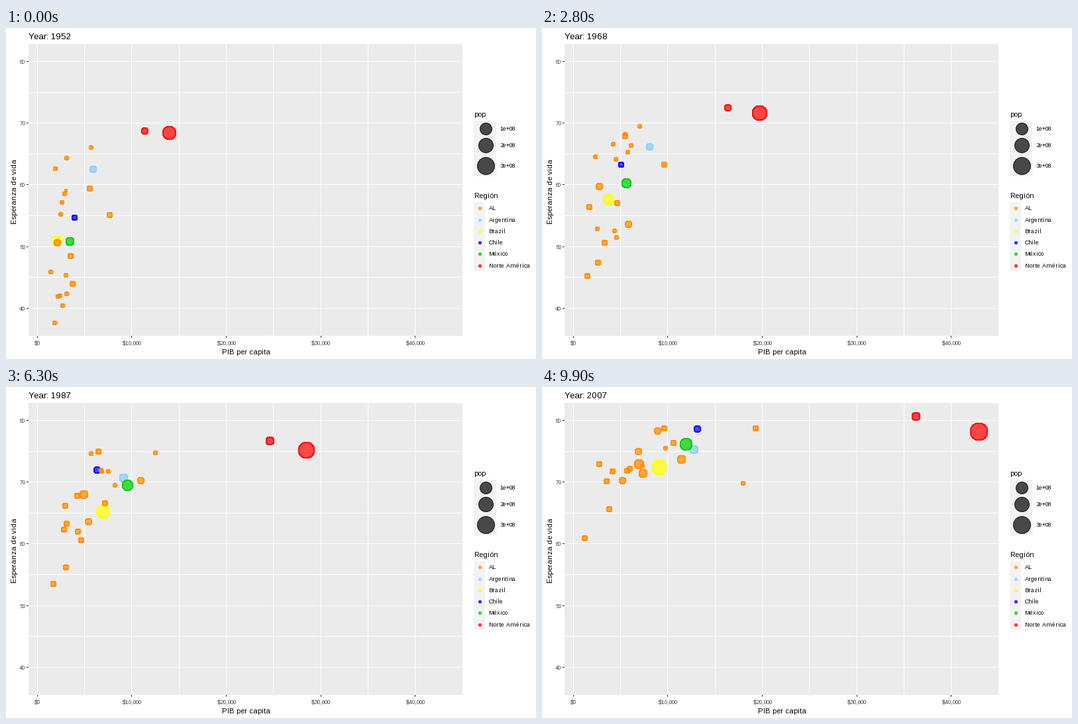
A matplotlib script for the animation above (10000 ms loop, 800 by 500 pixels).

```python
import numpy as np
import matplotlib.pyplot as plt
from matplotlib.animation import FuncAnimation
from matplotlib.colors import to_rgba
from matplotlib.patches import Rectangle

plt.rcParams["font.family"] = "Liberation Sans"
plt.rcParams["text.hinting_factor"] = 1  # whole-pixel glyph widths

W, H, DPI = 800, 500, 100
PT = 72 / DPI  # points per pixel
LEFT, RIGHT, TOP, BOTTOM = 34, 689, 24.3, 465.1
FRAMES, STEP, SPAN = 100, 9, 11  # a survey every nine frames, five years apart
INCOME_KEYS = (0, 3, 6, 8, SPAN)
LIFE_KEYS = (0, 6, SPAN)
POP_RANGE = 0.66, 301.1
FILL, RIM = 0.7, 0.85  # opacities

COLORS = {
    "AL": "darkorange", "Argentina": "#87CEFF", "Brazil": "yellow",
    "Chile": "blue", "México": "#00CD00", "Norte América": "red",
}

tracks = []


def track(region, pop, income, life):
    """Key points: population in millions, income in $100, life in years."""
    tracks.append((COLORS[region], pop, income, life))


track("Argentina", (17.9, 40.3), (59, 80.5, 90, 93, 128), (62.5, 69.5, 75.3))
track("AL", (2.9, 9.1), (27, 26, 31.6, 29.6, 38), (40.4, 53.9, 65.6))
track("Brazil", (56.6, 190), (21, 36, 70, 69.5, 90.7), (50.9, 63.3, 72.4))
track("Norte América", (14.8, 33.4), (114, 161, 229, 263.4, 363), (68.8, 75.7, 80.7))
track("Chile", (6.4, 16.3), (39.4, 51, 51, 76, 131.7), (54.7, 70, 78.6))
track("AL", (12.4, 44.2), (21.4, 26.8, 44, 54.4, 70), (50.6, 66.2, 72.9))
track("AL", (0.9, 4.1), (26.3, 41.6, 52.6, 61.6, 96.5), (57.2, 73, 78.8))
track("AL", (6, 11.4), (55.9, 54, 73.2, 56, 89.5), (59.4, 73.5, 78.3))
track("AL", (2.5, 9.3), (14, 16.5, 28.6, 30.4, 60), (45.9, 64, 72.2))
track("AL", (3.5, 13.8), (35.2, 45.8, 72, 71, 68.7), (48.4, 64.3, 75))
track("AL", (2, 6.9), (30.5, 43.6, 41, 44.4, 57.3), (45.3, 59.5, 71.9))
track("AL", (3.1, 12.6), (24.3, 32.4, 48.2, 44.4, 51.9), (42, 58.1, 70.3))
track("AL", (3.2, 8.5), (18.4, 14.5, 20, 14.6, 12), (37.6, 51.5, 60.9))
track("AL", (1.5, 7.5), (22, 25.4, 31.2, 30.8, 35.5), (41.9, 60.9, 70.2))
track("AL", (1.4, 2.8), (29, 61.2, 60.7, 74, 73.2), (58.5, 71, 72.6))
track("México", (30.1, 108.7), (34.8, 55, 96, 94.7, 119.8), (50.8, 67.4, 76.2))
track("AL", (1.2, 5.7), (31, 46.4, 34.7, 21.7, 27.5), (42.3, 59.6, 72.9))
track("AL", (0.9, 3.2), (24.8, 44.2, 70, 66.2, 98), (55.2, 70.2, 75.5))
track("AL", (1.6, 6.7), (19.5, 23, 42.6, 42, 41.7), (62.6, 66.9, 71.8))
track("AL", (8, 28.7), (37.6, 57.9, 64.3, 44.5, 74), (43.9, 61.3, 71.4))
track("AL", (2.2, 3.9), (30.8, 69.3, 103.3, 146.4, 193.3), (64.3, 73.6, 78.7))
track("AL", (0.66, 1.1), (30.2, 56.2, 91.2, 73.7, 180), (59.1, 68.8, 69.8))
track("Norte América", (157.6, 301.1), (140, 195.3, 250, 320, 429.5), (68.4, 74.3, 78.2))
track("AL", (2.3, 3.4), (57.2, 54.4, 69.2, 81.4, 106), (66.1, 70.8, 76.4))
track("AL", (5.4, 26.1), (76.9, 95.4, 111.5, 107.3, 114.2), (55.1, 68.8, 73.7))


def scale(lo, hi, start, end):
    """Linear map that leaves 5% room at both ends."""
    pad = 0.05 * (hi - lo)
    return lambda v: start + (v - lo + pad) / (hi - lo + 2 * pad) * (end - start)


px = scale(1201.6, 42951.7, LEFT, RIGHT)
py = scale(37.58, 80.65, BOTTOM, TOP)


def dot_size(pop):
    lo, hi = POP_RANGE
    return 2 + 10 * np.sqrt((np.asarray(pop) - lo) / (hi - lo))


def area(size):
    """Scatter area of a dot sized in millimetres, in whole-pixel radii."""
    radius = np.round(0.375 * (size * 72.27 / 25.4 + 0.945))
    return (2 * radius * PT) ** 2


def pixel(v):
    return np.round(v) + 0.5


fig = plt.figure(figsize=(W / DPI, H / DPI), dpi=DPI, facecolor="white")
ax = fig.add_axes([0, 0, 1, 1])
ax.set(xlim=(0, W), ylim=(H, 0))
ax.axis("off")


def box(x0, y0, x1, y1, color):
    ax.add_patch(Rectangle((x0, y0), x1 - x0, y1 - y0, fc=color, lw=0,
                           aa=False, zorder=1))


def label(x, y, s, size, color="black", **kw):
    return ax.text(x, y, s, fontsize=size * PT, color=color, va="baseline", **kw)


def dots(x, y, size, colors):
    return ax.scatter(pixel(x), pixel(y), s=area(size),
                      c=[to_rgba(c, FILL) for c in colors],
                      edgecolors=[to_rgba(c, RIM) for c in colors],
                      linewidths=PT, antialiaseds=False, zorder=3)


def vline(x, y0, y1, color):
    x = np.round(x)
    box(x, y0, x + 1, y1, color)


def hline(y, x0, x1, color):
    y = np.round(y)
    box(x0, y, x1, y + 1, color)


# Panel, grid and axes
box(LEFT, 24, RIGHT, 465, "#EBEBEB")
for v in range(0, 45000, 5000):
    vline(px(v), 24, 465, "white")
for v in range(40, 85, 5):
    hline(py(v), LEFT, RIGHT, "white")
for v in range(0, 50000, 10000):
    vline(px(v), 465, 468, "#333333")
    label(px(v) + 0.5, 479, f"${v:,}", 9, "#4D4D4D", ha="center")
for v in range(40, 90, 10):
    hline(py(v), 31, LEFT, "#333333")
    label(29, np.round(py(v)) + 4, str(v), 9, "#4D4D4D", ha="right")
label(362, 493, "PIB per capita", 11, ha="center")
label(16, 246.5, "Esperanza de vida", 11, rotation=90,
      rotation_mode="anchor", ha="center")

# Legends
label(706, 134, "pop", 11)
box(706, 140, 740, 224, "#F2F2F2")
y = 139.7
for n in (1, 2, 3):
    size = dot_size(100 * n)
    height = size * 7.2 / 2.54
    mid = y + height / 2
    dots([723], [mid], size, ["black"])
    label(745, np.round(mid) + 4, f"{n}e+08", 9)
    y += height

label(706, 257, "Región", 11)
box(706, 263, 723, 367, "#F2F2F2")
for i, (name, color) in enumerate(COLORS.items()):
    mid = 262.6 + 17.28 * (i + 0.5)
    dots([714], [mid], 1.5, [color])
    label(729, np.round(mid) + 4, name, 9)

# Moving dots: income in straight legs, life expectancy on a parabola
colors, pops, incomes, lives = zip(*tracks)
first, last = dot_size(pops).T
bend, slope, base = np.polyfit(LIFE_KEYS, np.transpose(lives), 2)


def state(t):
    income = np.array([100 * np.interp(t, INCOME_KEYS, row) for row in incomes])
    life = base + slope * t + bend * t * t
    return px(income), py(life), first + (last - first) * t / SPAN


title = label(34, 17, "", 13)
cloud = dots(*state(0), colors)


def update(frame):
    t = frame / STEP
    x, y, size = state(t)
    title.set_text(f"Year: {round(1952 + 5 * t)}")
    cloud.set_offsets(np.column_stack([pixel(x), pixel(y)]))
    cloud.set_sizes(area(size))
    return title, cloud


anim = FuncAnimation(fig, update, frames=FRAMES, interval=100, repeat=True)
plt.show()
```
